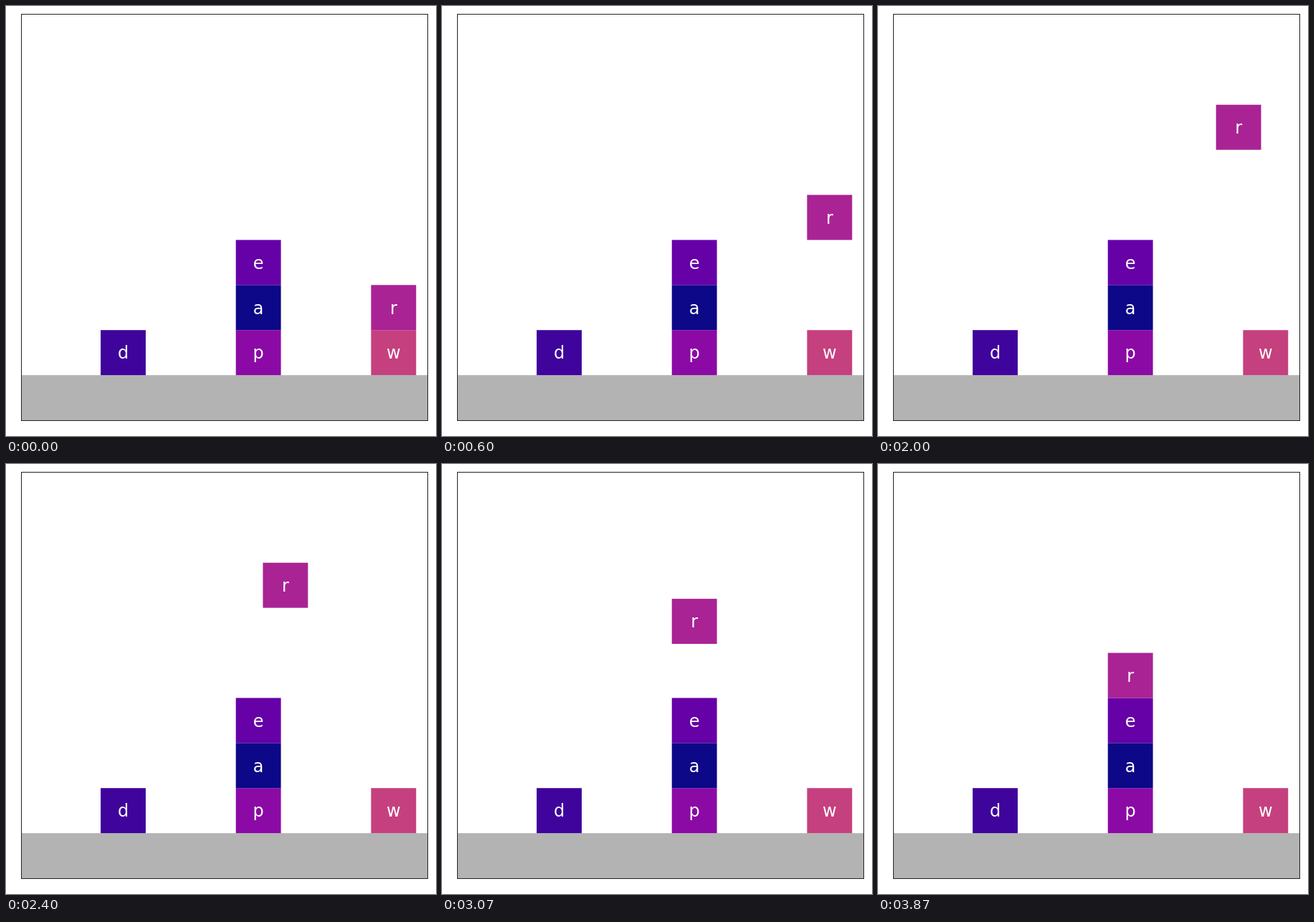
An HTML page with a canvas for the animation above (4870 ms loop, 600 px wide and 600 px high).

```html
<!DOCTYPE html>
<html lang="en">
<head>
<meta charset="utf-8">
<title>Block stacking</title>
<style>
html, body { margin: 0; width: 100%; height: 100%; overflow: hidden; background: #fff; }
canvas { display: block; }
</style>
</head>
<body>
<canvas id="stage" width="600" height="600"></canvas>
<script>
const ctx = document.getElementById('stage').getContext('2d');
const LOOP = 4870, LAST = 58;
const LEFT = 22, TOP = 12, SIZE = 566, UNIT = SIZE / 9;
const COLUMN = [1.75, 4.75, 7.75];

// Fixed blocks: letter, colour, column, height above the bottom (in units)
const blocks = [
  ['d', '#3f049c', COLUMN[0], 1],
  ['p', '#8b0aa5', COLUMN[1], 1],
  ['a', '#0d0887', COLUMN[1], 2],
  ['e', '#6600a7', COLUMN[1], 3],
  ['w', '#c5407e', COLUMN[2], 1]
];

// 15 ticks per second, each starting on a whole hundredth of a second
function tickAt(ms) {
  return Math.min(LAST, Math.floor((Math.floor(ms / 10) + 0.5) * 0.15));
}

// Position of the carried block: lift, slide left, lower
function carried(tick) {
  let x = COLUMN[2], y = 2;
  if (tick > 0) y = Math.min(6, 2 + (tick + 1) * 0.2);
  if (tick >= 30) x = Math.max(COLUMN[1], COLUMN[2] - (tick - 28) * 0.3);
  if (tick > 38) y = 6 - (tick - 38) * 0.1;
  return [x, y];
}

function drawBlock(letter, colour, col, row) {
  const x = LEFT + col * UNIT;
  const y = TOP + SIZE - (row + 1) * UNIT;
  ctx.fillStyle = colour;
  ctx.fillRect(x, y, UNIT, UNIT);
  ctx.fillStyle = '#fff';
  ctx.fillText(letter, x + UNIT / 2, y + UNIT / 2 + 8.8);
}

function draw(ms) {
  ctx.fillStyle = '#fff';
  ctx.fillRect(0, 0, 600, 600);
  ctx.fillStyle = '#b3b3b3';
  ctx.fillRect(LEFT, TOP + SIZE - UNIT, SIZE, UNIT);

  ctx.font = '24px "DejaVu Sans", sans-serif';
  ctx.textAlign = 'center';
  ctx.textBaseline = 'alphabetic';
  for (const block of blocks) drawBlock(...block);
  drawBlock('r', '#a92395', ...carried(tickAt(ms)));

  ctx.strokeStyle = '#222';
  ctx.lineWidth = 1;
  ctx.strokeRect(LEFT - 0.5, TOP - 0.5, SIZE + 1, SIZE + 1);
}

const start = performance.now();
function loop() {
  draw((performance.now() - start) % LOOP);
  requestAnimationFrame(loop);
}
loop();
</script>
</body>
</html>
```
